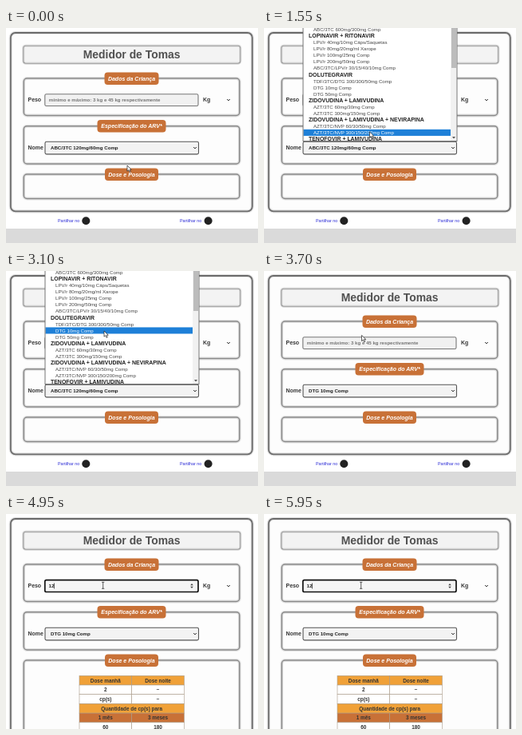
Animation of 316x269 px, one loop 6 s. Source, as an HTML page:

```html
<!DOCTYPE html>
<html lang="pt">
<head>
<meta charset="utf-8">
<style>
  html, body { margin: 0; height: 100%; overflow: hidden; background: #fff; }
  svg { display: block; width: 316px; height: 269px; font-family: "Liberation Sans", Arial, sans-serif; }
</style>
</head>
<body>
<svg id="stage" viewBox="0 0 316 269"></svg>
<script>
const stage = document.getElementById('stage');
const LOOP = 6000, OPEN = 1250, PICK = 3400, FOCUS = 4200, KEY1 = 4600, KEY2 = 4800;
const ROW = 8.06, FIRST_ROW = 1.9;

const rect = (x, y, w, h, fill, more = '') =>
  `<rect x="${x}" y="${y}" width="${w}" height="${h}" fill="${fill}" ${more}/>`;
const text = (x, y, size, str, fill = '#333', more = '') =>
  `<text x="${x}" y="${y}" font-size="${size}" fill="${fill}" ${more}>${str}</text>`;
const path = (d, stroke, width = 1, fill = 'none') =>
  `<path d="${d}" stroke="${stroke}" stroke-width="${width}" fill="${fill}"/>`;
const bold = 'font-weight="700"';
const middle = bold + ' text-anchor="middle"';

// Rounded outline with a soft edge
const panel = (x, y, w, h, r, color, width, fill = 'none') =>
  rect(x, y, w, h, fill, `rx="${r}" stroke="#e2e2e2" stroke-width="${width + 2.4}"`) +
  rect(x, y, w, h, 'none', `rx="${r}" stroke="${color}" stroke-width="${width}"`);
const fieldset = (y, h) => panel(22.3, y, 270.5, h, 4, '#8a8a8a', 1.5);
const legend = (x, y, w, str) =>
  rect(x, y, w, 15.5, '#c87137', 'rx="4"') +
  text(x + w / 2, y + 10.2, 7, str, '#fff', middle + ' font-style="italic"');
const chevron = (x, y) => path(`M${x - 1.8} ${y - 1}l1.8 1.9l1.8-1.9`, '#222', 1);
const share = (x, dot) =>
  text(x, 243.2, 5.3, 'Partilhar no', '#2929d6') +
  `<circle cx="${dot}" cy="241.2" r="5" fill="#222"/>`;

// A leading # marks a group heading
const options = [
  'ABC/3TC 600mg/300mg Comp',
  '#LOPINAVIR + RITONAVIR',
  'LPV/r 40mg/10mg Cáps/Saquetas',
  'LPV/r 80mg/20mg/ml Xarope',
  'LPV/r 100mg/25mg Comp',
  'LPV/r 200mg/50mg Comp',
  'ABC/3TC/LPV/r 30/15/40/10mg Comp',
  '#DOLUTEGRAVIR',
  'TDF/3TC/DTG 300/300/50mg Comp',
  'DTG 10mg Comp',
  'DTG 50mg Comp',
  '#ZIDOVUDINA + LAMIVUDINA',
  'AZT/3TC 60mg/30mg Comp',
  'AZT/3TC 300mg/150mg Comp',
  '#ZIDOVUDINA + LAMIVUDINA + NEVIRAPINA',
  'AZT/3TC/NVP 60/30/50mg Comp',
  'AZT/3TC/NVP 300/150/200mg Comp',
  '#TENOFOVIR + LAMIVUDINA'
];

function dropdown(cursorY) {
  const hover = Math.round((cursorY - FIRST_ROW) / ROW);
  const rows = options.map((name, i) => {
    const y = FIRST_ROW + i * ROW;
    if (name[0] === '#') return text(56, y + 2.5, 6.95, name.slice(1), '#222', bold);
    const on = i === hover;
    return (on ? rect(49.5, y - 4, 184.5, ROW, '#1e80d8') : '') +
      text(62, y + 2.2, 6.1, name, on ? '#fff' : '#444');
  });
  return rect(49, -3, 193, 144.5, '#fff') +
    `<g clip-path="url(#list)">${rows.join('')}</g>` +
    rect(234, -3, 7.5, 144.5, '#f1f1f1') + rect(235, -3, 6, 53, '#bcbcbc') +
    path('M236 136h4l-2 2.4z', 'none', 0, '#555') +
    rect(49, -3, 193, 144.5, 'none', 'stroke="#666" stroke-width=".9"');
}

function table() {
  const cell = (x, y, w, fill, str, color) =>
    rect(x, y, w, 11.8, fill, 'stroke="#a99a88" stroke-width=".6"') +
    text(x + w / 2, y + 8.3, 6.4, str, color, middle);
  const pair = (i, fill, a, b) =>
    cell(92, 202.3 + i * 11.7, 65.7, fill, a) + cell(157.7, 202.3 + i * 11.7, 65.7, fill, b);
  return pair(0, '#f0a138', 'Dose manhã', 'Dose noite') +
    pair(1, '#fff', '2', '−') + pair(2, '#fff', 'cp(s)', '−') +
    cell(92, 237.4, 131.4, '#f0a138', 'Quantidade de cp(s) para') +
    pair(4, '#c87137', '1 mês', '3 meses') + pair(5, '#fff', '60', '180');
}

function weightField(t) {
  const focus = t >= FOCUS;
  const typed = t >= KEY2 ? '12' : t >= KEY1 ? '1' : '';
  const caretX = 53.6 + typed.length * 3.4;
  return rect(48.8, 82.7, 192.2, 14.8, focus ? '#f5f5f5' : '#f1f1f1',
      `rx="1.8" stroke="${focus ? '#111' : '#777'}" stroke-width="${focus ? 1.7 : 1.1}"`) +
    (typed ? text(53.6, 92.2, 6.15, typed, '#222', bold)
           : text(53.8, 92.2, 6.1, 'mínimo e máximo: 3 kg e 45 kg respectivamente', '#757575', bold)) +
    (focus ? path(`M${caretX} 86.5v7`, '#111', .7) +
      path('M231.2 89.3l1.8-2.3l1.8 2.3zM231.2 90.8l1.8 2.3l1.8-2.3z', 'none', 0, '#444') : '');
}

// time, x, y
const route = [
  [0, 152, 172], [250, 151, 171], [800, 136, 153.5], [1300, 136, 153.5],
  [1950, 125.3, 82.5], [2400, 125.3, 82.5], [2800, 123, 75],
  [3450, 123, 75], [4050, 121.7, 89.3], [LOOP, 121.7, 89.3]
];
function cursorAt(t) {
  const i = route.findIndex(p => p[0] > t);
  const [t0, x0, y0] = route[i - 1], [t1, x1, y1] = route[i];
  const u = (t - t0) / (t1 - t0), e = u * u * (3 - 2 * u);
  return [x0 + (x1 - x0) * e, y0 + (y1 - y0) * e];
}
function cursor(x, y, beam) {
  return beam
    ? path(`M${x - 1.6} ${y - 4}h3.2M${x} ${y - 4}v8M${x - 1.6} ${y + 4}h3.2`, '#333', .8)
    : path(`M${x} ${y}v7.2l1.7-1.5l1.3 2.7l1.3-.6l-1.3-2.6h2.3z`, '#222', .7, '#fff');
}

function draw(now) {
  const t = now % LOOP;
  const open = t >= OPEN && t < PICK, result = t >= KEY2;
  const [x, y] = cursorAt(t);
  stage.innerHTML =
    '<clipPath id="list"><rect x="49" y="0" width="193" height="141"/></clipPath>' +
    (result ? '' : rect(0, 251, 316, 18, '#dadada') + share(65, 100.3) + share(218, 253.6)) +
    panel(5.8, 6, 303, result ? 300 : 223.3, 6, '#6c6c6c', 1.8, '#fdfdfd') +
    panel(21.8, 22.2, 272, 22, 3, '#999', 1.1, '#f3f3f3') +
    text(157.6, 38.3, 13.9, 'Medidor de Tomas', '#505050', middle) +
    fieldset(63, 46.5) + legend(123.5, 55.5, 68, 'Dados da Criança') +
    text(27.5, 92.4, 6.95, 'Peso', '#333', bold) + weightField(t) +
    text(247, 92.4, 6.95, 'Kg', '#333', bold) + chevron(279, 90) +
    fieldset(122.7, 47.3) + legend(114.5, 115, 86, 'Especificação do ARV*') +
    text(27.5, 152.4, 6.95, 'Nome', '#333', bold) +
    rect(49, 142.3, 192.5, 15.6, '#f3f3f3', 'rx="1.8" stroke="#555" stroke-width="1.1"') +
    text(56, 152.2, 6.15, t < PICK ? 'ABC/3TC 120mg/60mg Comp' : 'DTG 10mg Comp', '#222', bold) +
    chevron(237, 150) +
    fieldset(183, result ? 110 : 30.5) + legend(124, 175.5, 67, 'Dose e Posologia') +
    (result ? table() : '') + (open ? dropdown(y) : '') +
    cursor(x, y, t >= PICK && y > 82.7);
}

function frame() {
  draw(performance.now());
  requestAnimationFrame(frame);
}
frame();
</script>
</body>
</html>
```
